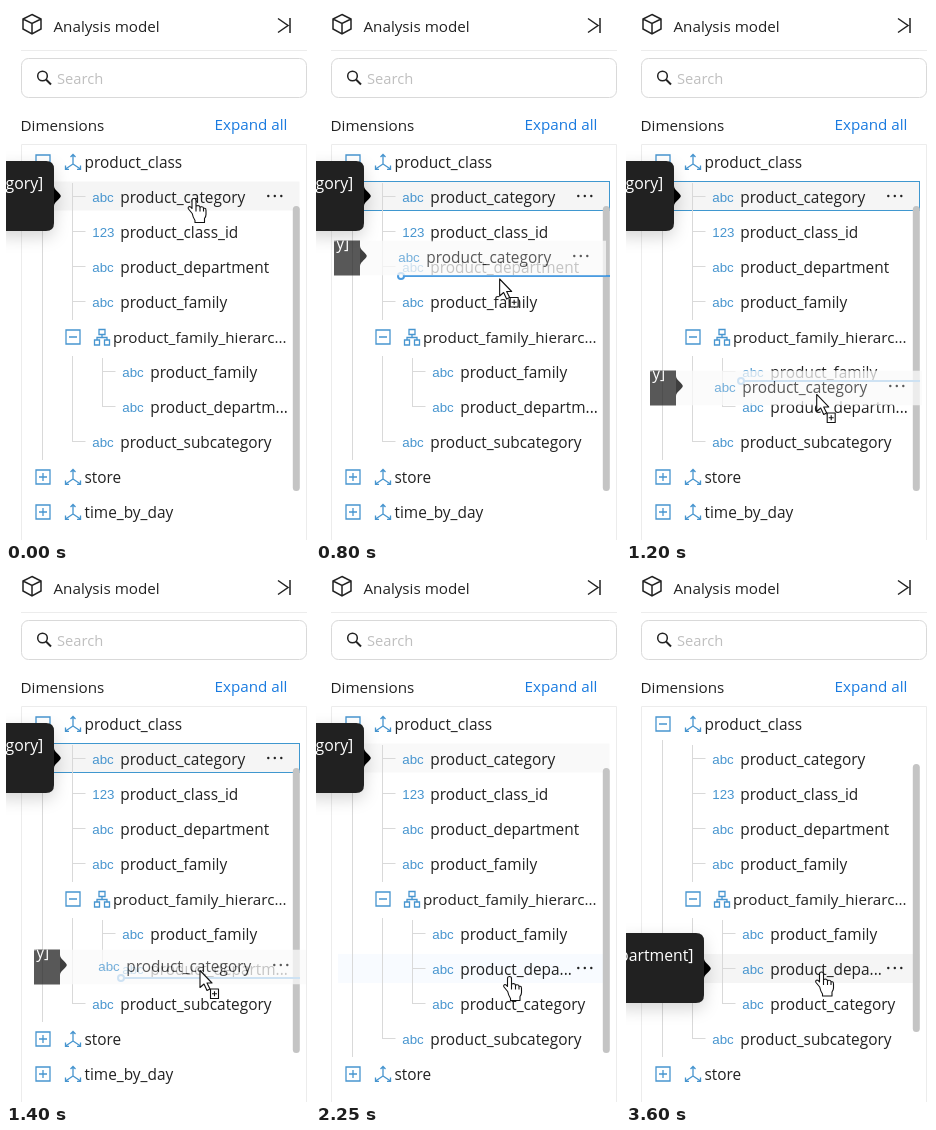
Recreate the animation shown at these times as an HTML page. Size 304 by 534 pixels, loop 3650 ms.

```html
<!DOCTYPE html>
<html lang="en">
<head>
<meta charset="utf-8">
<title>Analysis model</title>
<style>
html, body { margin: 0; width: 100%; height: 100%; overflow: hidden; background: #fff; }
svg { display: block; width: 100vw; height: 100vh; }
text { font: 15.4px "Open Sans", "Noto Sans", sans-serif; fill: #222; }
.ui { font-size: 15.2px; }
.type { font: 13.3px "Liberation Sans", Arial, sans-serif; fill: #4795cf; }
.icon { fill: none; stroke: #4795cf; stroke-width: 1.3; }
.dark { fill: none; stroke: #222; stroke-width: 1.5; }
.guide { fill: none; stroke: #d9d9d9; }
.tip path { fill: #212121; }
.tip text { fill: #fff; font-size: 15.8px; text-anchor: end; }
.shadow { filter: drop-shadow(0 6px 8px rgba(0, 0, 0, .16)); }
.pointer { fill: #fff; stroke: #111; stroke-width: 1.1; stroke-linejoin: round; }
</style>
</head>
<body>
<svg viewBox="0 0 304 534">
  <defs>
    <clipPath id="dragArea"><rect x="22" y="174.5" width="272" height="35"/></clipPath>
    <clipPath id="listArea"><rect y="139" width="304" height="387"/></clipPath>
    <path id="axes" class="icon" d="M0 2V-7M0 2L-7.500 7M0 2L7.500 7M-2.500 -5L0 -7.500L2.500 -5M-7.500 3.500V7.300H-4M7.500 3.500V7.300H4"/>
    <path id="plus" class="icon" d="M-7 -7H7V7H-7ZM-4 0H4M0 -4V4"/>
    <path id="minus" class="icon" d="M-7 -7H7V7H-7ZM-4 0H4"/>
    <path id="hierarchy" class="icon" d="M-3 -7.500H3V-2.500H-3ZM0 -2.500V.5M-5 3V.5H5V3M-7.500 3H-2.500V8H-7.500ZM2.500 3H7.500V8H2.500Z"/>
    <g id="dots" fill="#222"><circle cx="262.300" r="1.200"/><circle cx="268.800" r="1.200"/><circle cx="275.300" r="1.200"/></g>
    <path id="tipArrow" d="M0 -10C0 -6 6.800 -2.500 6.800 0S0 6 0 10Z"/>
    <g id="categoryTip" class="tip">
      <path d="M-9 155H40Q48 155 48 163V217Q48 225 40 225H-9Z"/>
      <use href="#tipArrow" x="48" y="190"/>
      <text x="37.300" y="183">product_category]</text>
    </g>
  </defs>

  <rect width="304" height="534" fill="#fff"/>
  <path class="dark" d="M26 8.500L35 13V23L26 28L17 23V13ZM17 13L26 17.500L35 13M26 17.500V28"/>
  <text class="ui" x="47.500" y="25.500">Analysis model</text>
  <path class="dark" d="M272 12.500L282 19.500L272 26.500M284 12V27"/>
  <path d="M15 44.500H301" stroke="#ececec"/>
  <rect x="15.500" y="52.500" width="285" height="39" rx="7" fill="#fff" stroke="#d9d9d9"/>
  <circle class="dark" cx="36.500" cy="70" r="4.800"/>
  <path class="dark" style="stroke-width:2" d="M40 73.500L45 78.500"/>
  <text x="51" y="77.500" style="font-size:14.7px;fill:#bfbfbf">Search</text>
  <text class="ui" x="14.500" y="124.500">Dimensions</text>
  <text class="ui" x="208.500" y="124" style="fill:#1a7be0">Expand all</text>
  <path d="M15.500 534V138.500H300.500V534" fill="none" stroke="#ececec"/>

  <rect id="categoryRow" x="22.500" y="175.500" width="271" height="29"/>
  <rect id="departmentRow" x="22" y="386" width="272" height="29"/>
  <g clip-path="url(#listArea)">
    <g id="before"></g>
    <g id="after"></g>
  </g>
  <use id="rowDots" href="#dots"/>
  <rect id="thumb" x="286.800" width="7" rx="3.500" fill="#c4c4c4"/>
  <g id="dropLine" fill="#fff" stroke="#4a9be0" stroke-width="2"><path/><circle r="3"/></g>

  <use id="oldTip" class="shadow" href="#categoryTip"/>
  <g id="newTip" class="tip shadow">
    <path d="M-9 365H70Q78 365 78 373V427Q78 435 70 435H-9Z"/>
    <use href="#tipArrow" x="78" y="400.500"/>
    <text x="67.500" y="393.300">product_department]</text>
  </g>

  <g id="ghost" opacity=".75">
    <g clip-path="url(#dragArea)">
      <rect x="22" y="174.500" width="272" height="35" fill="#fafafa"/>
      <text class="type" x="86.300" y="195.500">abc</text>
      <text x="114.300" y="196.500">product_category</text>
      <use href="#dots" y="190"/>
      <use href="#categoryTip"/>
    </g>
  </g>
  <g id="hand"><path class="pointer" d="M-1.800 15L-5.500 10.500Q-6.500 8.500 -4.500 8Q-3.300 8 -2 10V2Q-2 0 0 0Q2 0 2 2V8Q2 7 4 7Q6 7.300 6 9Q6.500 8 8 8.300Q9.500 8.500 9.500 10Q10 9.500 11 9.800Q12 10 12 12V16Q12 18 10.500 20V24H1V22Q-1 19 -1.800 15ZM2 8V13M6 9V13M9.500 10V13"/></g>
  <g id="arrow">
    <path class="pointer" d="M0 0V17L4 13.500L7 20L10 18.500L7 12.500H12Z"/>
    <path class="pointer" d="M10.500 18.500H18.500V28H10.500ZM12 23.300H17M14.500 20.800V25.800"/>
  </g>
</svg>
<script>
const LOOP = 3650, STEP = 50, ROW = 35, TOP = 156;
const DRAG = 650, DROP = 2150, HOVER = 2300;
const $ = id => document.getElementById(id);
const show = (id, on) => $(id).style.display = on ? "" : "none";
const move = (id, [x, y]) => $(id).setAttribute("transform", `translate(${x} ${y})`);
const set = (id, attrs) => { for (const k in attrs) $(id).setAttribute(k, attrs[k]); };

const head = [
  ["dim", "product_class", "minus"], ["abc", "product_category"], ["123", "product_class_id"],
  ["abc", "product_department"], ["abc", "product_family"],
  ["group", "product_family_hierarc..."], ["leaf", "product_family"]
];
const tail = [["abc", "product_subcategory"], ["dim", "store", "plus"], ["dim", "time_by_day", "plus"]];

function row([kind, label, box], i) {
  const y = TOP + ROW * i;
  const use = (id, x) => `<use href="#${id}" x="${x}" y="${y}"/>`;
  const text = (x, s = label, cls = "", dy = 5.5) => `<text class="${cls}" x="${x}" y="${y + dy}">${s}</text>`;
  if (kind === "dim") return use(box, 37) + use("axes", 67) + text(78.5);
  if (kind === "group") return use("minus", 67) + use("hierarchy", 96) + text(107, label, "ui");
  const leaf = kind === "leaf", dx = leaf ? 30 : 0;
  return `<path class="guide" d="M${66.5 + dx} ${y - .5}h13"/>` +
    text(86.3 + dx, leaf ? "abc" : kind, "type", 4.5) + text(114.3 + dx, label);
}

function tree(id, leaves) {
  const rows = [...head, ...leaves.map(s => ["leaf", s]), ...tail];
  const last = TOP + ROW * (head.length + leaves.length);
  $(id).innerHTML = `<path class="guide" d="M36.500 172V${last + 18}M66.500 177V314M66.500 350V${last}M96.500 352V${last - ROW}"/>` +
    rows.map(row).join("");
}
tree("before", ["product_departm..."]);
tree("after", ["product_depa...", "product_category"]);

// Each key is [time, x, y].
function along(keys, t) {
  const i = keys.findIndex(k => k[0] > t);
  if (i === 0) return keys[0].slice(1);
  if (i < 0) return keys[keys.length - 1].slice(1);
  const a = keys[i - 1], b = keys[i], p = (t - a[0]) / (b[0] - a[0]);
  return [a[1] + (b[1] - a[1]) * p, a[2] + (b[2] - a[2]) * p];
}
const dragPath = [[600, 0, 0], [700, -2, 20], [800, -4, 60], [900, -5, 110], [1000, -3, 149.5], [1200, 2, 190], [1400, 6, 207]];
const handPath = [[DRAG, 188, 192.5], [DROP, 193.5, 408.5], [2250, 193.5, 408.5], [2500, 195.5, 404]];
const ramp = (t, a, b) => Math.min(1, Math.max(0, (t - a) / (b - a)));

function draw(t) {
  const dragging = t >= DRAG && t < DROP, dropped = t >= DROP, hovered = t >= HOVER;
  show("before", !dropped);
  show("after", dropped);

  set("categoryRow", {
    fill: hovered ? "none" : dropped ? "#f9f9f9" : "#f5f5f5",
    stroke: dragging ? "#3f97cf" : "none"
  });
  set("departmentRow", { fill: hovered ? "#f5f5f5" : dropped ? "#f8fbff" : "none" });
  set("rowDots", { y: dropped ? 400 : 190 });
  set("thumb", t < 2350 ? { y: 200, height: 285 } : { y: 196, height: 268 });
  set("oldTip", { opacity: 1 - ramp(t, HOVER, 2450) });
  set("newTip", { opacity: ramp(t, 2400, 2600) });

  const offset = along(dragPath, t), [cx, cy] = along(dragPath, t + 35);
  const target = Math.round(offset[1] / ROW);
  const lineX = target > 4 ? 115 : 85, lineY = 200 + ROW * target;
  show("dropLine", dragging && target > 0);
  $("dropLine").children[0].setAttribute("d", `M${lineX} ${lineY}H294`);
  $("dropLine").children[1].setAttribute("cx", lineX);
  $("dropLine").children[1].setAttribute("cy", lineY);

  show("ghost", dragging);
  show("arrow", dragging);
  show("hand", !dragging);
  move("ghost", offset);
  move("arrow", [188 + cx, 195.5 + cy]);
  move("hand", along(handPath, t));
}

function tick() {
  const t = performance.now() % LOOP;
  draw(Math.floor(t / STEP) * STEP);
  requestAnimationFrame(tick);
}
tick();
</script>
</body>
</html>
```
